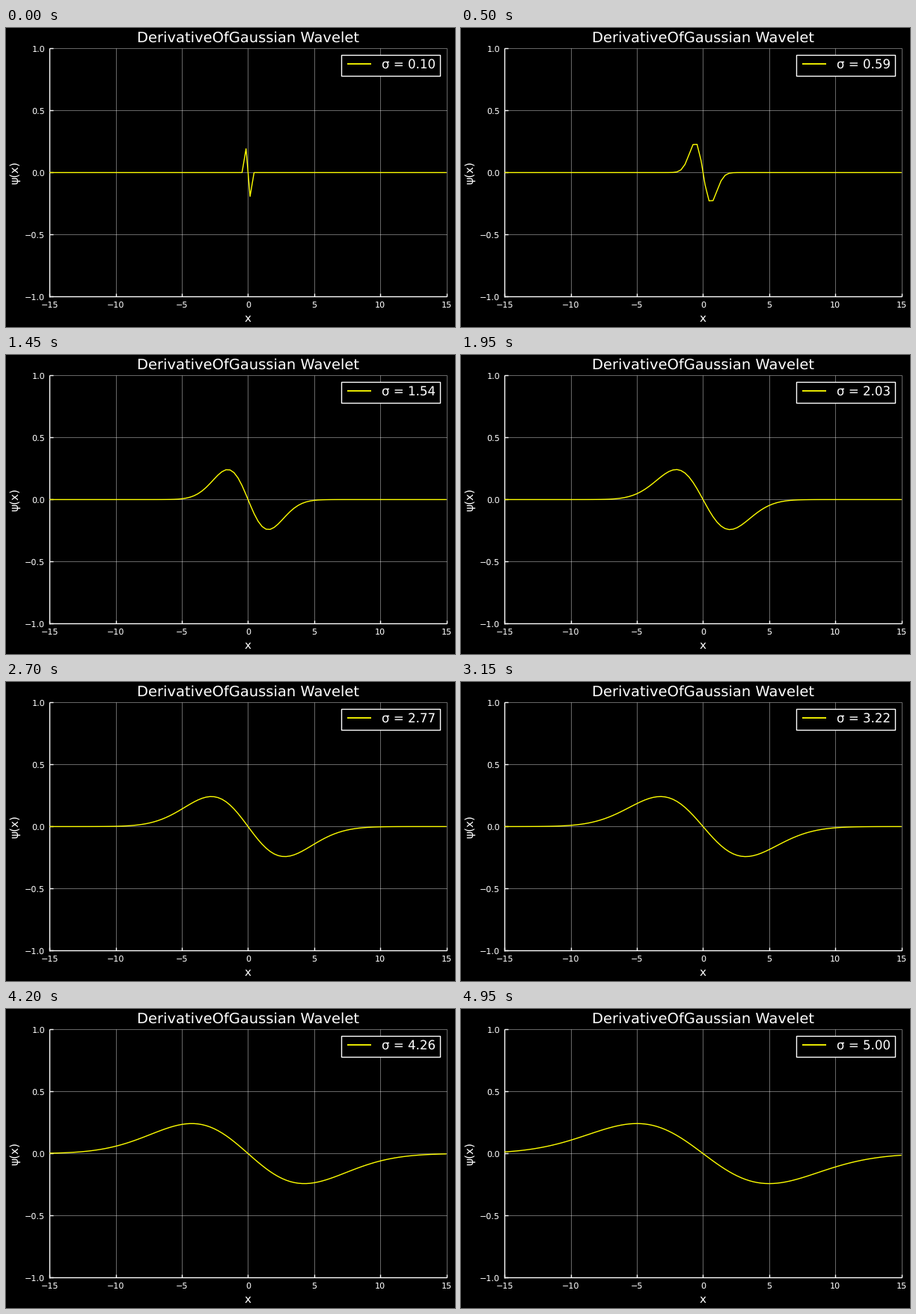
Recreate the animation shown at these times as a matplotlib script. Size 600x400 px, loop 5000 ms.

```python
import numpy as np
import matplotlib.pyplot as plt
from matplotlib.animation import FuncAnimation
from matplotlib.patches import Rectangle

plt.rcParams["font.family"] = "DejaVu Sans"
plt.rcParams["text.hinting"] = "none"

WIDTH, HEIGHT, DPI = 600, 400, 100
LEFT, RIGHT, TOP, BOTTOM = 58.3, 588.6, 27.4, 359.4
FRAMES, INTERVAL = 100, 50
TICK = 4.5

x = np.linspace(-15, 15, 100)
sigmas = np.linspace(0.1, 5, FRAMES)

fig = plt.figure(figsize=(WIDTH / DPI, HEIGHT / DPI), dpi=DPI, facecolor="black")
ax = fig.add_axes([0, 0, 1, 1])
ax.set_xlim(0, WIDTH)
ax.set_ylim(HEIGHT, 0)
ax.axis("off")


def px(value):
    return LEFT + (value + 15) / 30 * (RIGHT - LEFT)


def py(value):
    return BOTTOM - (value + 1) / 2 * (BOTTOM - TOP)


def line(xs, ys, color="white", lw=1.0, **kw):
    return ax.plot(xs, ys, color=color, lw=lw, solid_capstyle="butt", **kw)[0]


def label(tx, ty, text, size, ha="center", va="baseline", **kw):
    return ax.text(tx, ty, text, size=size, color="white", ha=ha, va=va, **kw)


def wavelet(sigma):
    u = x / sigma
    return -u * np.exp(-u**2 / 2) / np.sqrt(2 * np.pi)


def minus(text):
    return text.replace("-", "\u2212")


# Grid, ticks and tick labels
for v in range(-15, 16, 5):
    gx = px(v)
    line([gx, gx], [TOP, BOTTOM], lw=0.5, alpha=0.58)
    line([gx, gx], [BOTTOM, BOTTOM - TICK], zorder=3)
    label(gx, 374, minus(str(v)), 8)
for v in np.linspace(-1, 1, 5):
    gy = py(v)
    line([LEFT, RIGHT], [gy, gy], lw=0.5, alpha=0.58)
    line([LEFT, LEFT + TICK], [gy, gy], zorder=3)
    label(52, gy + 4, minus(f"{v:.1f}"), 8, ha="right")

# Axis lines
line([LEFT, LEFT], [TOP, BOTTOM + 0.7], zorder=3)
line([LEFT - 0.7, RIGHT], [BOTTOM, BOTTOM], zorder=3)

# Titles
label(323.3, 19, "DerivativeOfGaussian Wavelet", 14)
label(323.3, 393, "x", 11)
label(16, 193.3, "\u03c8(x)", 11, ha="right", va="center",
      rotation=90, rotation_mode="default").remove()
label(16, 193.3, "\u03c8(x)", 11, rotation=90, rotation_mode="anchor")

curve = line(x, x, color="yellow", zorder=4, snap=False)

# Legend
ax.add_patch(Rectangle((448.4, 36.4), 132, 28, facecolor="black",
                       edgecolor="white", lw=1, zorder=5))
line([456, 488], [48, 48], color="yellow", lw=1.3, zorder=6, snap=False)
legend = label(502, 54.2, "", 12, ha="left", zorder=6)


def update(i):
    sigma = sigmas[i]
    curve.set_data(px(x), py(wavelet(sigma)))
    legend.set_text(f"\u03c3 = {sigma:.2f}")
    return curve, legend


anim = FuncAnimation(fig, update, frames=FRAMES, interval=INTERVAL,
                     repeat=True, repeat_delay=0)
plt.show()
```
